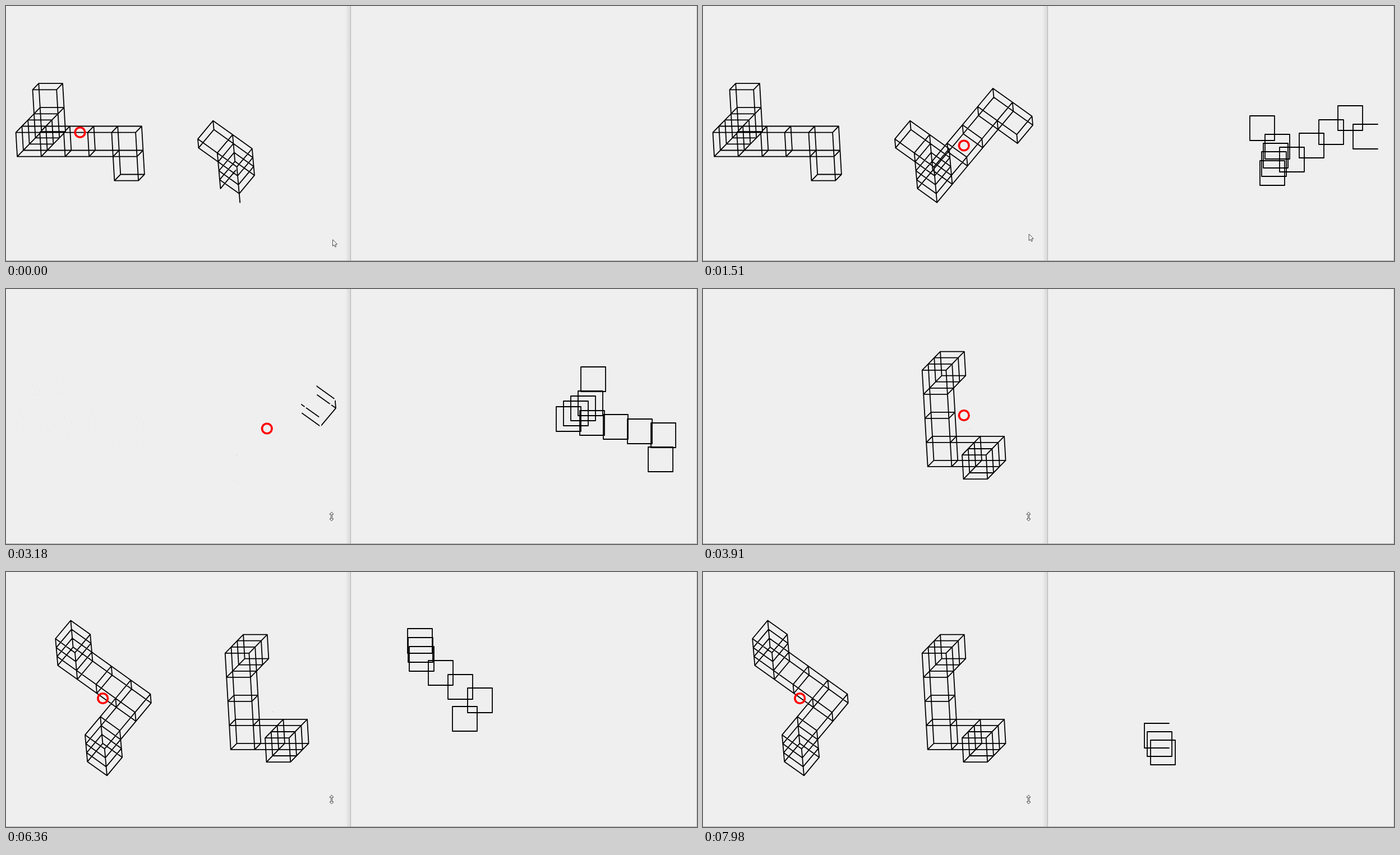
Recreate the animation shown at these times as an HTML page with a canvas. Size 1232x455 px, loop 8000 ms.

```html
<!DOCTYPE html>
<html lang="en">
<head>
<meta charset="utf-8">
<title>Block rotation</title>
<style>
html, body { margin: 0; width: 100%; height: 100%; overflow: hidden; background: #efefef; }
canvas { display: block; }
</style>
</head>
<body>
<canvas id="stage" width="1232" height="455"></canvas>
<script>
const ctx = document.getElementById('stage').getContext('2d');
const LOOP = 8000, BG = '#efefef', SIDE = 44.4, SHIFT = 618;

// A figure is a chain of ten cubes; capital letters step backwards.
const flat = { u: [42.7, 0], v: [10.8, -11.1], w: [2.5, 43] };
const tilted = { u: [34.8, 24.9], v: [27.2, -32.6], w: [1.4, 15.9] };
const settled = { u: [-4.5, 43.2], v: [42.2, 7.4], w: [-13, 9.2] };

function chain(start, path, axes) {
  const cells = [start];
  let [x, y] = start;
  for (const c of path) {
    const d = axes[c.toLowerCase()], s = c < 'a' ? -1 : 1;
    x += s * d[0];
    y += s * d[1];
    cells.push([x, y]);
  }
  return cells;
}

// Cube edges: direction, then the corner they leave from.
const EDGES = ['v000', 'v100', 'w000', 'w100', 'v001', 'v101',
  'w010', 'w110', 'u000', 'u010', 'u001', 'u011'];

function figure(start, path, axes) {
  const { u, v, w } = axes, edges = [];
  const cells = chain(start, path, axes);
  for (const [x, y] of cells) {
    for (const e of EDGES) {
      const [i, j, k] = [+e[1], +e[2], +e[3]], d = axes[e[0]];
      const px = x + i * u[0] + j * v[0] + k * w[0];
      const py = y + i * u[1] + j * v[1] + k * w[1];
      edges.push([px, py, px + d[0], py + d[1]]);
    }
  }
  const centers = cells.map(([x, y]) =>
    [x + (u[0] + v[0] + w[0]) / 2 + SHIFT, y + (u[1] + v[1] + w[1]) / 2]);
  return { edges, centers };
}

function turn(points, [cx, cy], deg) {
  const a = deg * Math.PI / 180, c = Math.cos(a), s = Math.sin(a);
  return points.map(([x, y]) =>
    [cx + (x - cx) * c - (y - cy) * s, cy + (x - cx) * s + (y - cy) * c]);
}

const first = figure([47.5, 149.3], 'wVVVuuuuw', flat);
const second = figure([342, 237.3], 'uwwwvvvvu', tilted);
const third = figure([412.3, 122.7], 'VVwwwuuVV', flat);
const fourth = figure([88.2, 119], 'wwuuuVVww', tilted);

const views = {
  a0: second.centers,
  a1: turn(second.centers, [1083, 249], 15),
  a2: chain([1046.7, 161], 'uwwwvvvvu', settled),
  b0: fourth.centers,
  b1: turn(fourth.centers, [791, 225], -15)
};

// Right pane: [draw from, erase from, erased at, view]
const passes = [
  [435, 651, 867, 'a0'], [868, 1083, 1298, 'a0'],
  [1298, 1513, 1729, 'a1'], [1729, 1946, 2161, 'a1'],
  [2161, 3203, 3322, 'a2'],
  [5690, 5938, 6187, 'b0'], [6187, 6433, 6760, 'b0'],
  [6760, 7087, 7414, 'b1'], [7414, 7741, 8068, 'b1']
];
const drawTime = p => p[3] === 'a2' ? 189 : p[1] - p[0];

// Edge counts over time for the left pane.
const grow2 = [[50, 53], [435, 120]];
const wipe = [[2600, 0], [3198, 240]];
const grow3 = [[3322, 0], [3398, 24], [3465, 24], [3770, 120]];
const grow4 = [[4795, 0], [5130, 48.3], [5680, 120]];

function lerp(keys, t, i = 1) {
  if (t <= keys[0][0]) return keys[0][i];
  for (let n = 1; n < keys.length; n++) {
    const a = keys[n - 1], b = keys[n];
    if (t < b[0]) return a[i] + (b[i] - a[i]) * (t - a[0]) / (b[0] - a[0]);
  }
  return keys[keys.length - 1][i];
}

function strokeEdges(edges, color, width) {
  if (!edges.length) return;
  ctx.strokeStyle = color;
  ctx.lineWidth = width;
  ctx.beginPath();
  for (const [x1, y1, x2, y2] of edges) {
    ctx.moveTo(x1, y1);
    ctx.lineTo(x2, y2);
  }
  ctx.stroke();
}

const black = (fig, n) => strokeEdges(fig.edges.slice(0, Math.floor(n)), '#000', 1.8);

function leftPane(t) {
  if (t < 3200) {
    black(first, 120);
    black(second, lerp(grow2, t));
    const gone = Math.floor(lerp(wipe, t));
    strokeEdges([...first.edges, ...second.edges].slice(0, gone), BG, 3.2);
  } else {
    black(third, lerp(grow3, t));
    black(fourth, lerp(grow4, t));
  }
}

function square([cx, cy], sides) {
  const l = Math.round(cx - SIDE / 2), t = Math.round(cy - SIDE / 2);
  const r = l + 44, b = t + 44;
  const all = [[l, t, r, t], [l, t, l, b], [l, b, r, b], [r, t, r, b]];
  strokeEdges(all.slice(0, sides), '#000', 1.8);
}

function rightPane(t) {
  const p = passes.find(q => t >= q[0] && t < q[2]);
  if (!p) return;
  const clamp = n => Math.max(0, Math.min(4, n));
  const drawn = Math.floor(40 * Math.min(1, (t - p[0]) / drawTime(p)));
  const gone = t < p[1] ? 0 : Math.floor(40 * (t - p[1]) / (p[2] - p[1]));
  views[p[3]].forEach((c, i) =>
    square(c, clamp(drawn - 4 * i) - clamp(gone - 4 * i)));
}

function marker(t) {
  const [x, y] = t < 435 ? [132, 225.5] : t < 3910 ? [465.3, 249]
    : t < 5690 ? [465.3, 225.5] : [172.7, 225.5];
  if (t >= 3910) {
    ctx.fillStyle = '#aaa';
    ctx.fillRect(475, 249, 1, 1);
  }
  ctx.strokeStyle = '#f00';
  ctx.lineWidth = 3.6;
  ctx.beginPath();
  ctx.arc(x, y, 8.8, 0, 7);
  ctx.stroke();
}

const mouse = [[50, 582.5, 417], [220, 582.5, 425], [600, 582.5, 415],
  [830, 582.5, 411], [1100, 582.5, 411], [1740, 580.5, 405]];
const arrow = [0, 0, 0, 11.5, 2.6, 9.2, 4.4, 13, 6.2, 12.2, 4.5, 8.5, 7.6, 8.2];
const resize = [0, -8, 3.5, -4, 1, -4, 1, 4, 3.5, 4, 0, 8, -3.5, 4, -1, 4, -1, -4, -3.5, -4];

function pointer(t) {
  const still = t >= 1780;
  const shape = still ? resize : arrow;
  const x = still ? 580.5 : lerp(mouse, t, 1), y = still ? 406 : lerp(mouse, t, 2);
  ctx.beginPath();
  for (let i = 0; i < shape.length; i += 2) ctx.lineTo(x + shape[i], y + shape[i + 1]);
  ctx.closePath();
  ctx.fillStyle = '#fff';
  ctx.strokeStyle = '#333';
  ctx.lineWidth = 0.9;
  ctx.fill();
  ctx.stroke();
}

const shade = ctx.createLinearGradient(605, 0, 614, 0);
shade.addColorStop(0, BG);
shade.addColorStop(1, '#d9d9d9');

function panes() {
  const bar = (color, x, y, w, h) => {
    ctx.fillStyle = color;
    ctx.fillRect(x, y, w, h);
  };
  bar(BG, 0, 0, 1232, 455);
  bar(shade, 605, 0, 9, 455);
  bar('#b4b4b4', 614, 0, 1, 455);
  bar('#a8a8a8', 0, 454, 1232, 1);
  bar('#c4c4c4', 1231, 0, 1, 455);
}

ctx.lineCap = 'round';
ctx.lineJoin = 'round';
const begin = performance.now();

function render() {
  const t = (performance.now() - begin) % LOOP;
  panes();
  leftPane(t);
  rightPane(t);
  marker(t);
  pointer(t);
  requestAnimationFrame(render);
}
render();
</script>
</body>
</html>
```
